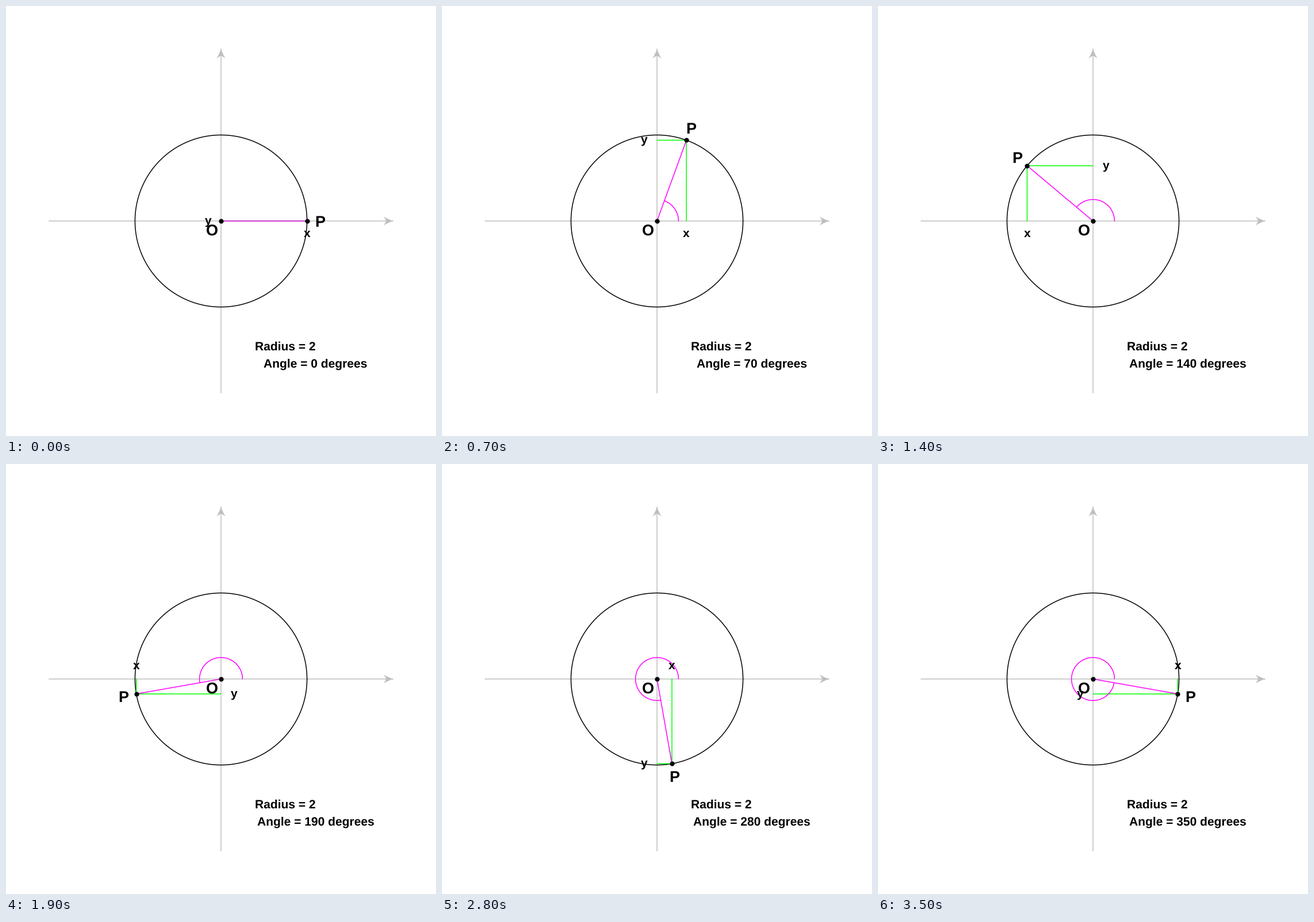
Write a matplotlib script that moves like this. It is 748x748 px and loops after 3600 ms.

```python
import matplotlib.pyplot as plt
import numpy as np
from matplotlib.animation import FuncAnimation
from matplotlib.patches import PathPatch
from matplotlib.path import Path

SIZE, DPI = 748, 100
UNIT = SIZE / 10          # the stage spans -5..5 on both axes
PX = 72 / DPI             # points per pixel
STEPS = 36
RADIUS, ARC_RADIUS, GAP = 2, 0.5, 0.3
GRAY, MAGENTA, GREEN = "#bebebe", "#ff00ff", "#00ff00"
CAP, X_HEIGHT = 0.729, 0.54   # glyph heights in em

plt.rcParams["text.hinting"] = "none"
fig = plt.figure(figsize=(SIZE / DPI, SIZE / DPI), dpi=DPI, facecolor="white")
ax = fig.add_axes([0, 0, 1, 1])
ax.set(xlim=(-5, 5), ylim=(-5, 5))
ax.axis("off")


def line(x, y, color, z):
    return ax.plot(x, y, color=color, lw=1.5 * PX, zorder=z, snap=False,
                   solid_capstyle="round", solid_joinstyle="round")[0]


def dot(x, y):
    return ax.plot([x], [y], "o", color="black", ms=8.2 * PX, mew=0,
                   zorder=6, snap=False)[0]


def drop(size, height):
    """Distance from the middle of a label down to its baseline."""
    return size * height / 2 / UNIT


def label(x, y, text, size, height=CAP):
    return ax.text(x, y - drop(size, height), text, fontsize=size * PX,
                   family="Liberation Sans", weight="bold", color="black",
                   ha="center", va="baseline", zorder=7)


def arc(radius, end):
    t = np.radians(np.linspace(0, end, max(2, int(end) + 1)))
    return radius * np.cos(t), radius * np.sin(t)


def arrow(turn):
    """Gray axis from -4 to 4 with a barbed head."""
    rot = np.array([[0, 1], [-1, 0]]) if turn else np.eye(2)
    shaft = np.array([[-4, 0], [4, 0]]) @ rot
    line(shaft[:, 0], shaft[:, 1], GRAY, 1)
    head = np.array([[0.5, 0], [-9, 2.6], [-16.5, 8], [-13, 3], [-11.5, 0],
                     [-13, -3], [-16.5, -8], [-9, -2.6], [0.5, 0]]) / UNIT
    codes = [Path.MOVETO] + [Path.CURVE3] * 8
    path = Path((head + [4, 0]) @ rot, codes)
    ax.add_patch(PathPatch(path, fc=GRAY, ec="none", zorder=1, snap=False))


arrow(False)
arrow(True)
line(*arc(RADIUS, 360), "black", 2)
dot(0, 0)
label(-GAP / np.sqrt(2), -GAP / np.sqrt(2), "O", 27)
label(1.5, -2.9, "Radius = 2", 21)

drop_x = line([], [], GREEN, 3)
drop_y = line([], [], GREEN, 3)
spoke = line([], [], MAGENTA, 4)
sweep = line([], [], MAGENTA, 4)
point = dot(0, 0)
name_p = label(0, 0, "P", 27)
name_x = label(0, 0, "x", 21, X_HEIGHT)
name_y = label(0, 0, "y", 21, X_HEIGHT)
caption = label(2.2, -3.3, "", 21)


def update(i):
    angle = i * 360 // STEPS
    c, s = np.cos(np.radians(angle)), np.sin(np.radians(angle))
    x, y = RADIUS * c, RADIUS * s
    drop_x.set_data([x, x], [0, y])
    drop_y.set_data([0, x], [y, y])
    spoke.set_data([0, x], [0, y])
    sweep.set_data(*(arc(ARC_RADIUS, angle) if angle else ([], [])))
    point.set_data([x], [y])
    far = RADIUS + GAP
    name_p.set_position((far * c, far * s - drop(27, CAP)))
    name_x.set_position((x, (-GAP if s >= 0 else GAP) - drop(21, X_HEIGHT)))
    name_y.set_position((-GAP if c >= 0 else GAP, y - drop(21, X_HEIGHT)))
    caption.set_text(f"Angle = {angle} degrees")
    return drop_x, drop_y, spoke, sweep, point, name_p, name_x, name_y, caption


anim = FuncAnimation(fig, update, frames=STEPS, interval=100, repeat=True,
                     repeat_delay=0, init_func=lambda: update(0))
plt.show()
```
